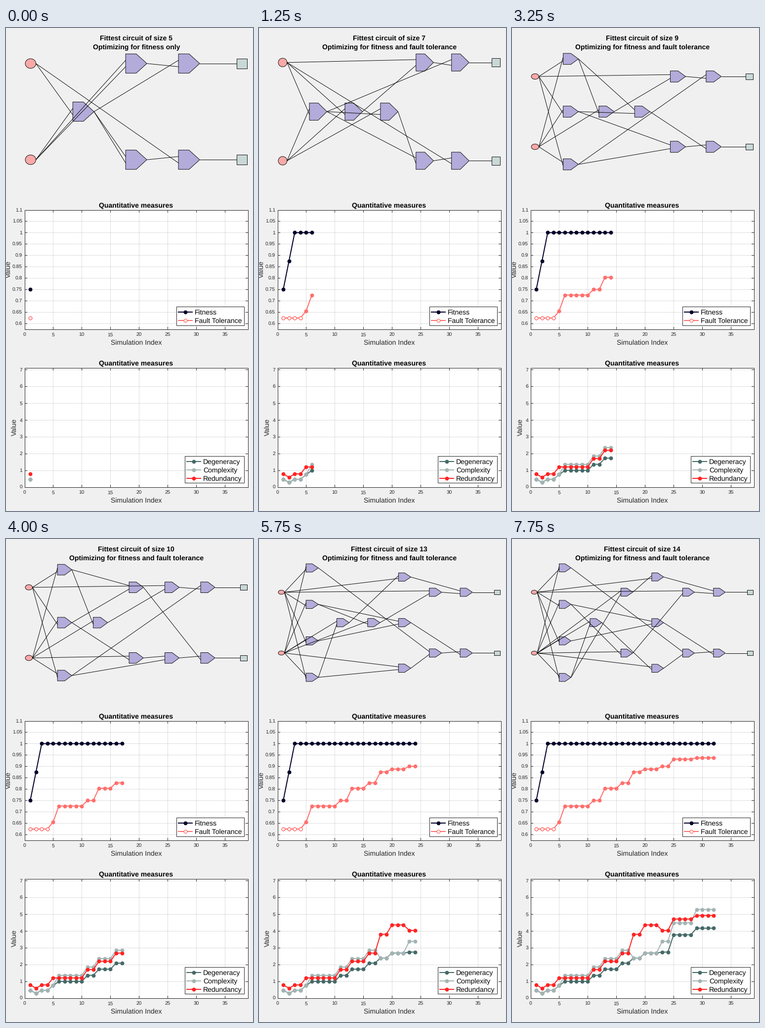
A matplotlib script that plays this animation: 500x976 px, repeating every 8 s.

```python
import numpy as np
import matplotlib.pyplot as plt
from matplotlib.animation import FuncAnimation
from matplotlib.collections import LineCollection
from matplotlib.patches import Ellipse, Polygon, Rectangle

plt.rcParams["font.family"] = "Liberation Sans"
plt.rcParams["text.hinting"] = "none"

W, H = 500, 976
PT = 0.72  # points per pixel at 100 dpi
INK = "#262626"
GATE, SOURCE, SINK = "#b3abd9", "#f8a9a8", "#c9d8d7"
NAVY, CORAL = "#000028", "#ff6f6c"
TEAL, GREY, RED = "#456a68", "#a3b4b3", "#ff2424"
LEFT, RIGHT, X_MAX = 37.5, 489.5, 39
MID_Y = 169
FRAMES = 32
UNTUNED = 4  # simulations that optimise fitness only

fig = plt.figure(figsize=(W / 100, H / 100), dpi=100, facecolor="#f0f0f0")
ax = fig.add_axes([0, 0, 1, 1])
ax.set_xlim(0, W)
ax.set_ylim(H, 0)
ax.axis("off")


def text(x, y, s, size=14, ha="center", color=INK, **kw):
    return ax.text(x, y, s, fontsize=size * PT, ha=ha, va="baseline",
                   color=color, **kw)


def line(xs, ys, color=INK, width=1, **kw):
    return ax.plot(xs, ys, color=color, lw=width * PT, **kw)[0]


def dotted(xs, ys, color, face=None, z=4):
    return line(xs, ys, color, 2, marker="o", ms=6.6 * PT, mew=1.3 * PT,
                mfc=face or color, zorder=z, solid_capstyle="butt")


def box(x0, y0, x1, y1, face="white", edge=INK, z=1):
    ax.add_patch(Rectangle((x0, y0), x1 - x0, y1 - y0, facecolor=face,
                           edgecolor=edge, lw=PT, zorder=z))


# ---- charts ----

class Chart:
    def __init__(self, top, low, high, ticks, label_x):
        bottom = top + 241
        self.top, self.bottom, self.low, self.high = top, bottom, low, high
        box(LEFT, top, RIGHT, bottom, edge="none", z=0)
        for v in range(0, X_MAX, 5):
            x = self.x(v)
            line([x, x], [top, bottom], alpha=0.15)
            for y, d in ((top, 4.5), (bottom, -4.5)):
                line([x, x], [y, y + d])
            text(x, bottom + 14.5, str(v), 10.3)
        for v in ticks:
            y = self.y(v)
            line([LEFT, RIGHT], [y, y], alpha=0.15)
            for x, d in ((LEFT, 4.5), (RIGHT, -4.5)):
                line([x, x + d], [y, y])
            text(33, y + 3.7, f"{v:g}", 10.3, ha="right")
        box(LEFT, top, RIGHT, bottom, face="none", z=3)
        text(263.5, top - 5.5, "Quantitative measures", color="black",
             weight="bold")
        text(263.5, bottom + 31.5, "Simulation Index")
        text(label_x, (top + bottom) / 2, "Value", rotation=90,
             rotation_mode="anchor")

    def x(self, v):
        return LEFT + (RIGHT - LEFT) * np.asarray(v) / X_MAX

    def y(self, v):
        part = (np.asarray(v) - self.low) / (self.high - self.low)
        return self.bottom + (self.top - self.bottom) * part


def legend(x0, y0, x1, y1, entries):
    box(x0, y0, x1, y1, z=6)
    for i, (name, color, face) in enumerate(entries):
        y = y0 + 11.3 + 17.2 * i
        key = dotted(x0 + np.array([3.5, 18.5, 33.5]), [y] * 3, color, face, z=7)
        key.set_markevery([1])
        text(x0 + 37.5, y + 5, name, ha="left", color="black", zorder=7)


upper = Chart(367.5, 0.576, 1.1, np.arange(12, 23) * 0.05, 8.5)
lower = Chart(686.5, 0, 7.11, range(8), 21)
legend(344.5, 562.5, 481.5, 600.5,
       [("Fitness", NAVY, None), ("Fault Tolerance", CORAL, "white")])
legend(361.5, 864.5, 481.5, 918.5,
       [("Degeneracy", TEAL, None), ("Complexity", GREY, None),
        ("Redundancy", RED, None)])

# ---- circuit growth ----

# Each gate is named and reads two nodes, upper port first; x and y are the
# sources, u and v the sinks. Unlisted gates read both sources.
wiring = dict(T="at", B="bx", u="T", v="B")
starts, circuits = [], []


def evolve(start, core, **changes):
    """Rewire from simulation `start` on; `core` lists the inner columns."""
    wiring.update(changes)
    columns = f"xy {core} tb TB uv".split()
    starts.append(start)
    circuits.append((columns, {n: wiring.get(n, "yx")
                               for n in "".join(columns[1:])}))


evolve(1, "a", t="yy", b="aa")
evolve(2, "a", b="ay")
evolve(3, "a", t="xy")
evolve(5, "a c", t="xc", b="ac")
evolve(6, "a c d", d="ya", b="ad")
evolve(11, "ak c d", b="kd", T="kt")
evolve(13, "amk c e", c="ya", e="am", b="mk", B="be")
evolve(16, "amk c eg", g="ym", b="gk")
evolve(18, "amnk c eg", c="ym", e="mn", g="yk", b="ag")
evolve(20, "amnk d c eg", d="yk", g="yd")
evolve(23, "amnk d c heg", h="dx", g="yk", T="ht")
evolve(25, "amnk d c heg", g="yd")
evolve(29, "amnk d pc heg", p="yk", h="px")

index = np.arange(1, FRAMES + 1)
stage = np.searchsorted(starts, index, side="right") - 1


def plateaus(keys):
    """Hold one level per stage, evenly stepped between the key stages."""
    return np.interp(stage, list(keys), list(keys.values()))


fitness = np.minimum(1, 0.75 + (index - 1) / 8)
tolerance = plateaus({2: 0.625, 3: 0.656, 4: 0.726, 5: 0.75, 6: 0.804,
                      7: 0.828, 8: 0.876, 10: 0.9, 11: 0.932, 12: 0.9375})
degeneracy = plateaus({0: 0.46, 1: 0.28, 2: 0.46, 3: 0.74, 4: 0.99, 7: 2.08,
                       9: 2.68, 10: 2.74, 11: 3.77, 12: 4.16})
complexity = plateaus({0: 0.46, 1: 0.28, 2: 0.46, 3: 0.74, 4: 1.35, 7: 2.85,
                       8: 2.38, 9: 2.68, 10: 3.38, 11: 4.48, 12: 5.28})
redundancy = plateaus({0: 0.78, 1: 0.58, 2: 0.78, 3: 1.2, 4: 1.2, 7: 2.68,
                       8: 3.8, 9: 4.36, 10: 4.03, 11: 4.71, 12: 4.92})

# chart, line, values, longest length
curves = [(chart, dotted([], [], color, face), values, limit)
          for chart, color, face, values, limit in (
              (upper, NAVY, None, fitness, FRAMES),
              (upper, CORAL, None, tolerance, FRAMES),
              (upper, CORAL, "white", tolerance, UNTUNED),
              (lower, TEAL, None, degeneracy, FRAMES),
              (lower, GREY, None, complexity, FRAMES),
              (lower, RED, None, redundancy, FRAMES))]

# ---- circuit drawing ----


def circuit_size(columns):
    return sum(map(len, columns[1:-1]))


def layout(columns):
    """Node centres and radii; nodes shrink as the circuit grows."""
    shrink = 5 / circuit_size(columns)
    rows = max(map(len, columns))
    rx, ry = 10.75 * shrink ** 0.565, 0.0167 * shrink ** 0.4
    height = (229 + 2.2 * rows) / ((rows - 1) / (rows + 1) + 4 * ry)
    xs = np.linspace(39 + rx, 488.3 - rx, len(columns))
    centres = {}
    for x, names in zip(xs, columns):
        for i, name in enumerate(names, 1):
            centres[name] = x, MID_Y + height * (i / (len(names) + 1) - 0.5)
    return centres, rx, ry * height


def draw_circuit(columns, inputs):
    centres, rx, ry = layout(columns)
    style = dict(edgecolor="black", lw=0.9 * PT, zorder=2)

    def tip(name):
        x, y = centres[name]
        return x + (rx if name in "xy" else 2 * rx), y

    shapes, wires = [], []
    for name, (x, y) in centres.items():
        if name in "xy":
            shapes.append(Ellipse((x, y), 2 * rx, 2 * ry, facecolor=SOURCE, **style))
        elif name in "uv":
            shapes.append(Rectangle((x - rx, y - ry), 2 * rx, 2 * ry,
                                    facecolor=SINK, **style))
            wires.append([tip(inputs[name]), (x - rx, y)])
        else:
            l, t, b = x - 2 * rx, y - 2 * ry, y + 2 * ry
            shapes.append(Polygon([(l, t), (x, t), tip(name), (x, b), (l, b)],
                                  facecolor=GATE, **style))
            for source, side in zip(inputs[name], (-1, 1)):
                wires.append([tip(source), (l, y + side * ry * 2 / 3)])
    for shape in shapes:
        ax.add_patch(shape)
    net = LineCollection(wires, colors="black", linewidths=0.95 * PT, zorder=3)
    ax.add_collection(net, autolim=False)
    return shapes + [net]


heading = text(263.7, 25, "", color="black", weight="bold")
goal = text(263.9, 43, "", color="black", weight="bold")
parts = []


def update(frame):
    while parts:
        parts.pop().remove()
    columns, inputs = circuits[stage[frame]]
    parts.extend(draw_circuit(columns, inputs))
    heading.set_text(f"Fittest circuit of size {circuit_size(columns)}")
    goal.set_text("Optimizing for fitness "
                  + ("only" if frame < UNTUNED else "and fault tolerance"))
    for chart, curve, values, limit in curves:
        n = min(frame + 1, limit)
        curve.set_data(chart.x(index[:n]), chart.y(values[:n]))
    return parts


anim = FuncAnimation(fig, update, frames=FRAMES, interval=250,
                     repeat=True, repeat_delay=0, blit=False)
plt.show()
```
